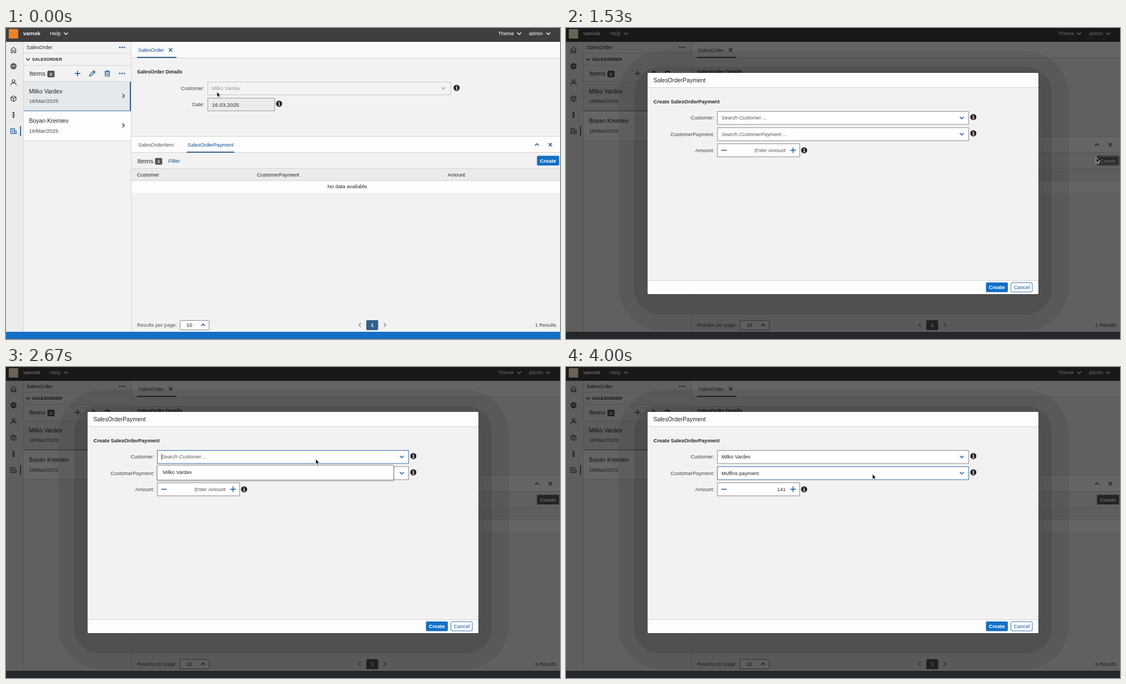
These frames come from a looping animation (998 by 561 pixels, 4070 ms). An HTML page:

```html
<!DOCTYPE html>
<html lang="en">
<head>
<meta charset="utf-8">
<style>
html, body { margin: 0; width: 100%; height: 100%; overflow: hidden; background: #f2f2f2 }
svg { display: block; width: 100vw; height: 100vh; font-family: "Liberation Sans", Arial, sans-serif }
text { white-space: pre }
.dim { filter: grayscale(.9) }
</style>
</head>
<body>
<svg id="stage" viewBox="0 0 998 561"></svg>
<script>
const DURATION = 4070, OPEN = 1530;
const INK = '#262626', BLUE = '#0d4f94', ACTION = '#146fc4', PRESSED = '#345f8f', LINE = '#d4d4d4';
const BUYER = 'Milko Vardev', OTHER = 'Boyan Kremiev';

const rect = (x, y, w, h, fill, more = '') =>
  `<rect x="${x}" y="${y}" width="${w}" height="${h}" fill="${fill}" ${more}/>`;
const box = (x, y, w, h, fill, stroke, more = '') =>
  rect(x + .5, y + .5, w - 1, h - 1, fill, `stroke="${stroke}" ${more}`);
// y is the vertical middle of the capitals
const text = (x, y, s, { size = 9.2, fill = INK, ...attrs } = {}) =>
  `<text x="${x}" y="${y + size * .36}" font-size="${size}" fill="${fill}" ${
    Object.entries(attrs).map(([k, v]) => `${k}="${v}"`).join(' ')}>${s}</text>`;
const bold = (x, y, s, o) => text(x, y, s, { 'font-weight': 700, ...o });
const label = (x, y, s) => text(x, y, s, { 'text-anchor': 'end', fill: '#444' });
const path = (x, y, d, color = BLUE, width = 1.4) =>
  `<path transform="translate(${x} ${y})" d="${d}" fill="none" stroke="${color}" stroke-width="${width}"/>`;
const chevron = (x, y, dir = 'down', color) => path(x, y, {
  down: 'M-3.5-1.8L0 1.8 3.5-1.8', up: 'M-3.5 1.8L0-1.8 3.5 1.8',
  left: 'M1.8-3.5L-1.8 0 1.8 3.5', right: 'M-1.8-3.5L1.8 0-1.8 3.5' }[dir], color);
const cross = (x, y) => path(x, y, 'M-3-3L3 3M3-3L-3 3');
const plus = (x, y) => path(x, y, 'M-5 0H5M0-5V5');
const dots = (x, y) => [-4, 0, 4].map(d => `<circle cx="${x + d}" cy="${y}" r="1.3" fill="${BLUE}"/>`).join('');
const info = (x, y) => `<circle cx="${x}" cy="${y}" r="5.5" fill="#222"/>` +
  rect(x - .8, y - 3.3, 1.6, 1.5, '#fff') + path(x, y, 'M-1.5-.7H.3V3M-1.6 3H1.8', '#fff', 1.2);
const badge = (x, y, s) => rect(x, y, 13, 12, '#555', 'rx="2"') +
  bold(x + 6.5, y + 6, s, { size: 8, fill: '#fff', 'text-anchor': 'middle' });
const group = (id, body, more = '') => `<g id="${id}" ${more}>${body}</g>`;

const sideIcons = [
  'M-5 0L0-5 5 0M-4-1V5H-1.5V1H1.5V5H4V-1',
  'M-5 0A5 5 0 1 0 5 0A5 5 0 1 0-5 0H5M0-5Q-5 0 0 5Q5 0 0-5M-4.2-2.5H4.2M-4.2 2.5H4.2',
  'M-2.5-2.5A2.5 2.5 0 1 0 2.5-2.5A2.5 2.5 0 1 0-2.5-2.5M-5 5Q-4.5.7 0 .7Q4.5.7 5 5',
  'M0-5L4.5-2.7V2.7L0 5L-4.5 2.7V-2.7ZM-4.5-2.7L0-.3 4.5-2.7M0-.3V5',
  'M0-5V5M-2-3L0-5 2-3M-2 3L0 5 2 3M-2.8 0H2.8',
  'M-5 4.5V-4.5H2V4.5ZM-3-2H0M-3 0H0M-3 2H0M2 0H5V4.5H2'
].map((d, i) => path(13.5, 39.7 + i * 29.25, d, i == 5 ? BLUE : '#333', 1.1)).join('');

const topBar = rect(0, 0, 998, 25, '#3e3e3e') +
  bold(31, 10, 'varnok', { size: 9.4, fill: '#fff' }) +
  text(79, 10, 'Help', { size: 9.5, fill: '#fff' }) + chevron(108, 10, 'down', '#fff') +
  text(886.5, 10, 'Theme', { fill: '#fff' }) + chevron(924.5, 10, 'down', '#fff') +
  text(942, 10, 'admin', { fill: '#fff' }) + chevron(977, 10, 'down', '#fff');

const item = (y, name) => text(41.5, y + 18, name, { size: 10.5 }) +
  text(41.5, y + 36, '16/Mar/2025', { size: 9.4, fill: '#444' }) + chevron(211.5, y + 26.5, 'right', '#333');
const listPane = rect(0, 25, 31, 523, '#ececec') + rect(31, 25, 1, 523, LINE) + sideIcons +
  rect(25.5, 177, 1.5, 18, '#1d3d60') +
  text(37, 35, 'SalesOrder') + dots(209, 35) + rect(32, 45, 193, 1, LINE) +
  chevron(39.5, 56.5, 'down', '#333') + bold(47, 56.5, 'SALESORDER', { size: 7.8 }) + rect(32, 67, 193, 1, LINE) +
  text(42, 82, 'Items', { size: 11.8 }) + badge(74.5, 77, 2) + plus(129, 82) +
  path(155.5, 82, 'M-5 5L-4 1.5 2.5-5 5-2.5-1.5 4ZM1-3.5L3.5-1', BLUE, 1.2) +
  path(182.5, 82, 'M-5-3.2H5M-2-3.2V-5H2V-3.2M-3.7-3V5H3.7V-3M-1.4-.8V3M1.4-.8V3', BLUE, 1.2) + dots(209, 82) +
  rect(32, 96, 193, 53, '#e5e8ec') + rect(32, 149, 193, 54, '#fdfdfd') +
  rect(32, 96, 193, 1, LINE) + rect(32, 149, 193, 1, '#3a72b0') + rect(223, 97, 2, 52, PRESSED) +
  rect(32, 202.5, 193, 1, LINE) + item(96, BUYER) + item(149.3, OTHER) + rect(225, 25, 1, 523, LINE);

const details = rect(226, 25, 772, 29, '#fafafa') + rect(226, 53.5, 772, 1, LINE) +
  text(238, 39.5, 'SalesOrder', { fill: BLUE }) + cross(296.5, 39.5) + rect(236, 52, 71, 2, PRESSED) +
  bold(236, 79, 'SalesOrder Details') +
  label(357.5, 108.5, 'Customer:') + box(363, 97, 438.5, 24, '#f3f3f3', '#c2c2c2') +
  text(370, 108.5, BUYER, { fill: '#999' }) + chevron(788, 108.5, 'down', '#86a4c4') + info(811.7, 108) +
  label(357.5, 138, 'Date:') + box(363, 126, 121.5, 24, '#ebebeb', '#999') +
  text(371, 138, '16.03.2025', { size: 9.8 }) + info(492, 136.5);

const payments = rect(226, 195, 772, 1, LINE) + rect(226, 196, 772, 28, '#fdfdfd') + rect(226, 224, 772, 1, LINE) +
  text(238, 210.3, 'SalesOrderItem', { fill: '#555' }) + text(327, 210.3, 'SalesOrderPayment', { fill: BLUE }) +
  rect(325.5, 223, 85.5, 2, PRESSED) + chevron(956.5, 210.5, 'up') + cross(980.5, 210.5) +
  text(236.5, 239.5, 'Items', { size: 11.8 }) + badge(268.5, 234.5, 1) + text(292.5, 239.3, 'Filter', { size: 9.4, fill: BLUE }) +
  rect(956.5, 230.5, 40, 17.5, ACTION, 'id="create" rx="2"') +
  box(958, 232, 37, 14.5, 'none', '#fff', 'id="ring" stroke-width=".8" rx="1"') +
  bold(962, 239.3, 'Create', { size: 9.3, fill: '#fff' }) +
  rect(226, 253, 772, 23, LINE) + rect(226, 254, 772, 21, '#ebebeb') + rect(226, 276, 772, 21, '#fefefe') +
  text(236, 265, 'Customer') + text(452, 265, 'CustomerPayment') + text(795.5, 265, 'Amount') +
  text(579, 286, 'No data available.') +
  text(236, 535.7, 'Results per page:', { fill: '#555' }) + box(313, 527, 53.5, 18, '#fdfdfd', '#8a8a8a', 'rx="1"') +
  text(325, 535.7, '10', { size: 9.6 }) + chevron(355, 535.7, 'up') +
  chevron(637.5, 535.7, 'left', '#888') + rect(649, 527, 21.5, 18, PRESSED, 'rx="2"') +
  bold(659.7, 535.7, '1', { fill: '#fff', 'text-anchor': 'middle' }) + chevron(682.5, 535.7, 'right', '#888') +
  text(953, 535.7, '1 Results', { fill: '#444' }) + rect(0, 548, 998, 13, ACTION);

const combo = (id, y) => rect(272.7, y - 11.5, 452.6, 23.5, '#fff', `id="${id}Box" stroke="#888"`) +
  text(280, y, '', { id }) + chevron(713, y) + info(733.8, y - 1.3);
const modal = rect(0, 0, 998, 561, '#000', 'opacity=".6"') +
  rect(94, 41, 812, 505, '#000', 'rx="80" opacity=".07"') +
  rect(123, 70, 752, 447, '#000', 'rx="46" opacity=".1"') +
  rect(147, 81, 704, 399, '#f2f2f2', 'rx="2"') + rect(147, 81, 704, 26, '#fdfdfd', 'rx="2"') +
  rect(147, 107, 704, 1, LINE) + rect(147, 456, 704, 24, '#fdfdfd', 'rx="2"') + rect(147, 455, 704, 1, LINE) +
  text(157.5, 94.5, 'SalesOrderPayment', { size: 10.45 }) + bold(157.5, 133, 'Create SalesOrderPayment', { size: 9.25 }) +
  label(267, 162, 'Customer:') + combo('customer', 162) + rect(279.7, 156.5, .9, 11, '#222', 'id="caret"') +
  label(267, 191.3, 'CustomerPayment:') + combo('payment', 191.3) +
  label(267, 220.7, 'Amount:') + rect(272.7, 208.8, 148.2, 23.6, '#fff', 'stroke="#888"') +
  path(284.5, 220.5, 'M-5 0H5') + plus(409, 220.5) + text(395.7, 220.7, '', { id: 'amount', 'text-anchor': 'end' }) + info(429, 220.7) +
  rect(756.5, 459, 39.5, 17.5, ACTION, 'rx="2"') + bold(761.7, 467.7, 'Create', { size: 9.3, fill: '#fff' }) +
  box(801, 459, 39.5, 17.5, '#fff', BLUE, 'stroke-width=".8" rx="2"') + text(806.7, 467.7, 'Cancel', { fill: BLUE }) +
  group('menu',
    rect(271, 177, 429, 30, '#000', 'rx="3" opacity=".12"') +
    box(271.5, 176.5, 427.5, 28, '#fff', '#777', 'rx="2"') +
    rect(273, 178, 424.5, 25, '#fff', 'id="option"') +
    box(274, 179, 422.5, 23, 'none', '#b9cbe0', 'id="optionRing" stroke-width=".7"') +
    text(282.5, 190, BUYER, { id: 'optionText' }));

stage.innerHTML = group('app', rect(0, 0, 998, 561, '#f2f2f2') + topBar + listPane + details + payments) +
  group('dialog', modal) + rect(5, 2, 17, 17, '#ee8125', 'id="logo" rx="1"') +
  '<path id="cursor" d="M0 0V9.4L2.2 7.4 3.7 10.7 5.3 10 3.8 6.8H6.7Z" fill="#000" stroke="#fff" stroke-width=".8"/>';

// time, x, y of the pointer tip
const route = [[0, 380, 115], [70, 380, 115], [1130, 955, 236], [1400, 958, 234], [1530, 955, 234], [1600, 955, 234],
  [2070, 576, 188], [2330, 558, 166], [2930, 558, 166], [3330, 560, 192], [3730, 560, 192], [4000, 552, 193], [DURATION, 552, 193]];
const $ = id => document.getElementById(id);
const set = (id, attrs) => { for (const k in attrs) $(id).setAttribute(k, attrs[k]); };
const show = (id, on) => set(id, { visibility: on ? 'inherit' : 'hidden' });

function field(id, value, hint) {
  $(id).textContent = value || hint;
  set(id, { 'font-style': value ? 'normal' : 'italic', fill: value ? INK : '#555' });
}

function draw(t) {
  const i = route.findIndex(p => t < p[0]), [t0, x0, y0] = route[i - 1], [t1, x1, y1] = route[i];
  const u = (t - t0) / (t1 - t0), e = u * u * (3 - 2 * u);
  set('cursor', { transform: `translate(${x0 + (x1 - x0) * e} ${y0 + (y1 - y0) * e})` });

  const open = t >= OPEN, menu = t >= 2400 && t < 3800, pressed = t >= 3670;
  show('dialog', open);
  set('app', { class: open ? 'dim' : '' });
  set('logo', { fill: open ? '#686353' : '#ee8125' });
  set('create', { fill: t < 1070 ? ACTION : t < 1330 ? '#1160ab' : PRESSED });
  show('ring', t >= 1330 && t < 2400);

  show('menu', menu);
  show('caret', menu && t < 3600);
  set('option', { fill: pressed ? PRESSED : t >= 3130 ? '#ebebeb' : '#fff' });
  show('optionRing', pressed);
  set('optionText', { fill: pressed ? '#fff' : INK });
  set('customerBox', { stroke: t >= 2150 && t < 3130 ? '#2f6fae' : '#888' });
  set('paymentBox', { stroke: (t >= 1930 && t < 2150) || t >= 3800 ? '#2f6fae' : '#888' });
  field('customer', t >= 3800 && BUYER, 'Search Customer ...');
  field('payment', t >= 3930 && 'Muffins payment', 'Search CustomerPayment ...');
  field('amount', t >= 3930 && '141', 'Enter Amount');
}

function tick() {
  draw(performance.now() % DURATION);
  requestAnimationFrame(tick);
}
tick();
</script>
</body>
</html>
```
